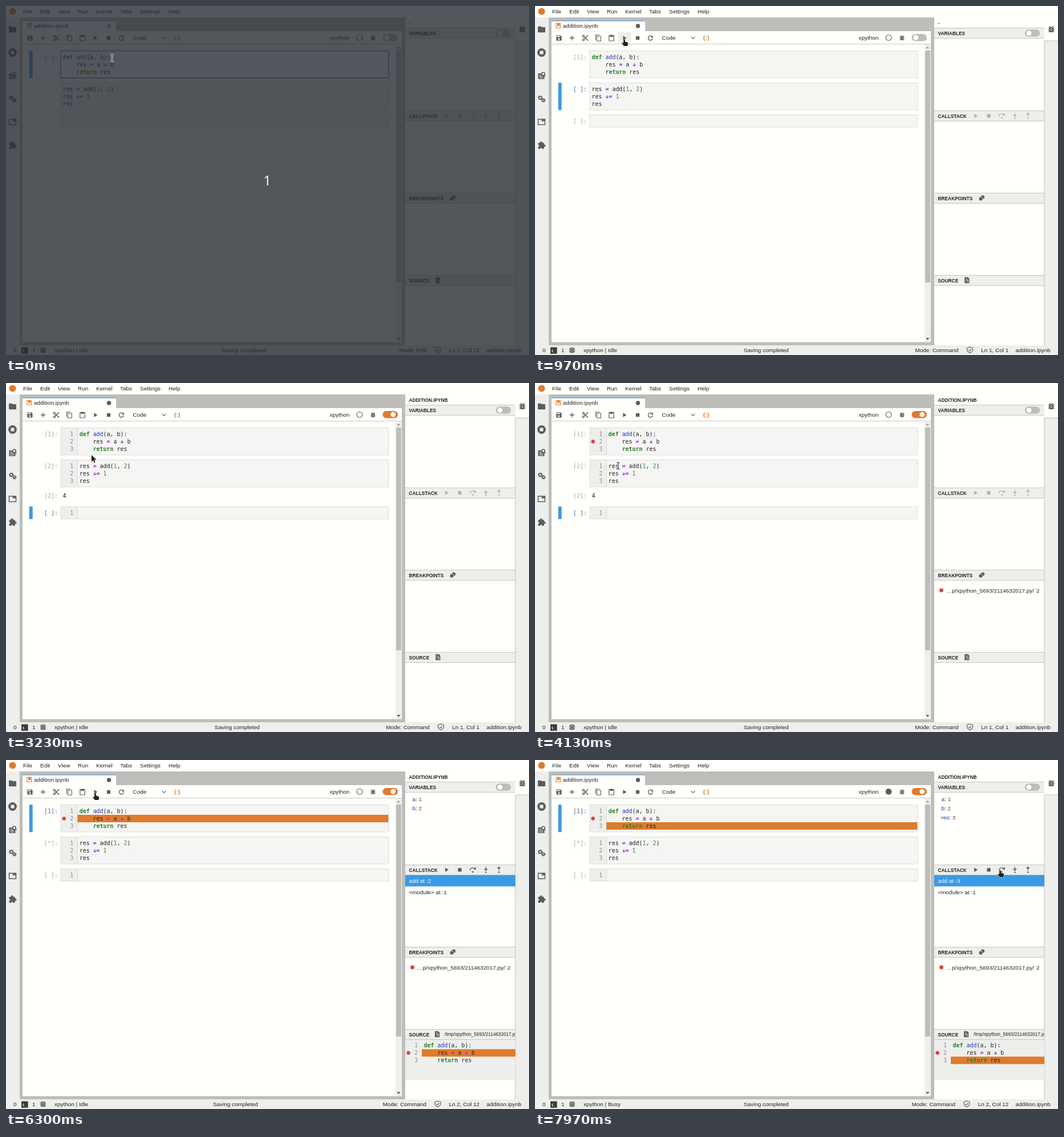
Animation, 917 px wide and 611 px high, one loop 8 s. Source, as an HTML page:

```html
<!DOCTYPE html>
<html lang="en">
<head>
<meta charset="utf-8">
<title>Notebook debugger</title>
<style>
html, body { margin: 0; width: 100%; height: 100%; overflow: hidden; background: #fffffc; }
svg { display: block; }
text { font: 9.95px "Liberation Sans", Arial, sans-serif; fill: #222; white-space: pre; }
.mono { font-family: "DejaVu Sans Mono", monospace; }
.head { font-size: 8.35px; font-weight: bold; }
.small { font-size: 8.2px; }
.kw { fill: #2a832a; font-weight: bold; }
.op { fill: #a02ae6; font-weight: bold; }
.num { fill: #3b8a3b; }
.fn { fill: #2035c0; }
.count { font: 23px "Noto Sans", sans-serif; fill: #fff; }
</style>
</head>
<body>
<svg id="stage" width="917" height="611" viewBox="0 0 917 611">
  <g id="base"></g><g id="live"></g><g id="cursor"></g>
</svg>
<script>
const LOOP = 8000;
const WHITE = '#fffffc', PANEL = '#eeeeec', GRAY = '#bdbdb9', ICON = '#5c5c5a',
      FAINT = '#b2b2af', BLUE = '#3c99e6', ORANGE = '#df7b2c', RED = '#d9413f';
const el = id => document.getElementById(id);

const rect = (x, y, w, h, fill, more = '') =>
  `<rect x="${x}" y="${y}" width="${w}" height="${h}" fill="${fill}" ${more}/>`;
const dot = (x, y, r, fill, more = '') => `<circle cx="${x}" cy="${y}" r="${r}" fill="${fill}" ${more}/>`;
const text = (x, y, s, cls = '', more = '') => `<text x="${x}" y="${y}" class="${cls}" ${more}>${s}</text>`;
const line = (d, color = ICON, w = 1.2) => `<path d="${d}" fill="none" stroke="${color}" stroke-width="${w}"/>`;
const shape = (d, fill = ICON) => `<path d="${d}" fill="${fill}" fill-rule="evenodd"/>`;
const at = (x, y, body, k = 1) => `<g transform="translate(${x} ${y}) scale(${k})">${body}</g>`;

// Icons are drawn around their centre.
const play = c => shape('M-2.6 -3.7V3.7L3.4 0z', c);
const stop = c => rect(-3.1, -3.1, 6.2, 6.2, c);
const bug = rect(-2.9, -3.4, 5.8, 7.4, ICON, 'rx="2.9"') +
  line('M-4.2 -2H4.2M-4.2 .6H4.2M-4.2 3.1H4.2M-2.6 -4.7L-1.3 -3.2M2.6 -4.7L1.3 -3.2', ICON, 1.1) +
  line('M-1.1 -.7H1.1M-1.1 1.4H1.1', PANEL, .9);
const stepOver = c => line('M-4.8 1A4.8 4.4 0 0 1 4 -1.7M4.7 -4.5V-1H1.2', c, 1.3) + dot(0, 3.6, 1.4, c);
const stepIn = c => line('M0 -5.4V.6M-2.8 -2L0 .9L2.8 -2', c, 1.3) + dot(0, 4.3, 1.3, c);
const stepOut = c => line('M0 -5V1.4M-2.8 -2.3L0 -5.1L2.8 -2.3', c, 1.3) + dot(0, 4.3, 1.3, c);
const gear = r => `<circle r="${r}" fill="none" stroke="${ICON}" stroke-width="1.7"/>
  <circle r="${r + 1.2}" fill="none" stroke="${ICON}" stroke-width="1.1" stroke-dasharray="1.2 1.4"/>`;
const toggle = (x, y, on) => rect(x, y, 26.5, 12.5, on ? ORANGE : GRAY, 'rx="6.25"') +
  dot(x + (on ? 18.3 : 7.3), y + 6.25, 4.4, WHITE);

function sideIcons() {
  const folder = shape('M-5.2 -5.2H-1.3L0 -3.9H5.2Q6.5 -3.9 6.5 -2.6V3.9Q6.5 5.2 5.2 5.2H-5.2Q-6.5 5.2 -6.5 3.9V-3.9Q-6.5 -5.2 -5.2 -5.2z');
  const running = dot(0, 0, 7.4, ICON) + rect(-3, -3, 6, 6, PANEL, 'rx=".6"');
  const inspect = shape('M-6 -4H1V-1H5V6H-6z') +
    line('M-4 -1H0M-4 1.5H2M-4 4H3', PANEL, 1) +
    dot(3, -3, 2.7, PANEL, `stroke="${ICON}" stroke-width="1.5"`) + line('M5 -1L7 1', ICON, 1.6);
  const gears = at(-2.2, -1.8, gear(2.4)) + at(3.2, 2.6, gear(2));
  const tab = line('M-6 -4.8H6V4.8H-6z', ICON, 1.5) + rect(0, -4.8, 6, 3.6, ICON);
  const puzzle = rect(-6, -4, 10.4, 10.4, ICON, 'rx="1"') + dot(-.8, -4.6, 2, ICON) + dot(5, 1, 2, ICON) +
    dot(-6, 1.2, 1.7, PANEL) + dot(-.8, 6.4, 1.7, PANEL);
  return [folder, running, inspect, gears, tab, puzzle].map((s, i) => at(11.5, 41 + i * 40.5, s)).join('');
}

function toolIcons() {
  const save = shape('M-4.6 -4.6H2.6L4.6 -2.6V4.6H-4.6zM-3.5 -3.5V-1.4H1.6V-3.5zM0 .4A1.6 1.6 0 1 0 .01 .4z');
  const add = line('M-4 0H4M0 -4V4', ICON, 1.3);
  const ring = `fill="none" stroke="${ICON}" stroke-width="1.2"`;
  const cut = `<circle cx="-3.2" cy="-3.2" r="1.6" ${ring}/><circle cx="-3.2" cy="3.2" r="1.6" ${ring}/>` +
    line('M-2 -2L5 4.6M-2 2L5 -4.6', ICON, 1.5);
  const copy = line('M-4.6 3.4V-5.2H2.2M-2.5 -3H4.3V5.3H-2.5z', ICON, 1.1);
  const paste = line('M-4.2 -4.4H4.2V5H-4.2z', ICON, 1.2) + rect(-2.6, -5.4, 5.2, 3.4, ICON);
  const restart = line('M3.2 -2.4A4 4 0 1 0 3.9 1', ICON, 1.3) + shape('M4.4 -4.6V-.6H.4z');
  const list = [[42, save], [65, add], [88, cut], [111, copy], [134, paste], [180, stop(ICON)], [202.5, restart]];
  return list.map(([x, s]) => at(x, 56, s)).join('');
}

function header(y, label) {
  return rect(700, y, 193, 19, PANEL) + line(`M700 ${y + .5}H893M700 ${y + 18.5}H893`, '#c6c6c3', 1) +
    text(706.5, y + 12.5, label, 'head');
}

function drawBase() {
  const menu = [['File', 30], ['Edit', 60], ['View', 91], ['Run', 126], ['Kernel', 158],
                ['Tabs', 200], ['Settings', 235], ['Help', 285]];
  const tabIcon = line('M36.8 30.2H44.6V38.2H36.8z', ORANGE, 1.1) + shape('M39 30.5H43.2V36L41.1 34.2L39 36z', ORANGE);
  const chip = line('M-3.4 -3.4H3.4V3.4H-3.4z', ICON, 1.3) + rect(-1.4, -1.4, 2.8, 2.8, ICON) +
    line('M-1.6 -5.4V5.4M1.6 -5.4V5.4M-5.4 -1.6H5.4M-5.4 1.6H5.4', ICON, .8);
  return rect(0, 0, 917, 611, GRAY) + rect(0, 0, 917, 20, WHITE) +
    rect(0, 20, 24, 574, PANEL) + rect(0, 594, 917, 17, PANEL) +
    dot(11.5, 9.5, 6, ORANGE) + menu.map(([s, x]) => text(x, 13, s)).join('') + sideIcons() +
    rect(29, 26, 164, 19, WHITE) + rect(29, 25.5, 164, 1.2, '#5ba4dc') + tabIcon + text(49, 38, 'addition.ipynb') +
    rect(29, 44, 665, 544.5, WHITE) + line('M29 66.7H694', '#c6c6c3', 1) + toolIcons() +
    text(222.5, 58.5, 'Code') + line('M274 54.2L277.2 57.4L280.4 54.2', ICON, 1.2) +
    text(294.5, 58.6, '{:}', '', `style="fill:${ORANGE};font-weight:bold"`) +
    text(567.5, 58.5, 'xpython') + at(643.5, 56, bug, .95) +
    rect(683, 67.5, 10.5, 521, PANEL) + shape('M685.3 74.2H691.3L688.3 70.8z', '#9b9b98') +
    shape('M685.3 581.2H691.3L688.3 584.6z', '#444') +
    rect(700, 20, 193, 574, WHITE) + header(38, 'VARIABLES') + header(183, 'CALLSTACK') +
    header(327, 'BREAKPOINTS') + header(471, 'SOURCE') + toggle(858.8, 41.3, false) +
    dot(785, 334.6, 3.2, ICON) + dot(781.6, 337.6, 3.5, ICON, `stroke="${PANEL}" stroke-width=".7"`) +
    rect(893, 20, 24, 574, PANEL) + rect(893, 20, 24, 41, WHITE) +
    line('M917 61H893V594', '#c0c0bd', 1) + at(905.3, 41, bug, 1.25) +
    text(13, 606, '0') + rect(27, 597.5, 11.6, 11.4, '#3a3a39') +
    text(28.6, 605.6, '$_', 'mono', 'style="font-size:6.5px;fill:#fff"') + text(46, 606, '1') +
    at(65, 602.6, chip) + text(842.5, 606, 'addition.ipynb');
}

const SOURCE = [['def add(a, b):', '    res = a + b', '    return res'], ['res = add(1, 2)', 'res += 1', 'res'], ['']];
const paint = s => s.replace(/(def|return)|(\+=|[=+])|(\b\d\b)|((?<=def )add)/g, (m, kw, op, num) =>
  `<tspan class="${kw ? 'kw' : op ? 'op' : num ? 'num' : 'fn'}">${m}</tspan>`);

// Code lines with optional numbers, breakpoint and stopped line.
function codeLines(rows, x, y, o) {
  return rows.map((row, i) => {
    const b = y + i * 13;
    let s = '';
    if (o.stopAt === i + 1) s += rect(x - 3.5, b - 10, o.width, 13, ORANGE);
    if (o.numbers) s += text(x - 10.5, b, i + 1, 'mono', 'text-anchor="end" style="fill:#8f8f8c"');
    if (o.mark === i + 1) s += dot(x - 27, b - 3.5, 3.2, RED);
    return s + text(x, b, paint(row), 'mono');
  }).join('');
}

const prompt = (y, s, color) => text(91, y, `[${s}]:`, 'mono', `text-anchor="end" style="fill:${color}"`);

function cell(s, i) {
  const y = i < 2 ? 78.5 + i * 56 : s.out ? 216.5 : 190.5;
  const h = i < 2 ? 47.5 : 21.5;
  const on = s.sel === i, edit = on && s.edit;
  let g = on ? rect(40.7, y - .3, 6, h + .6, BLUE, 'rx="1"') : '';
  g += rect(96, y, 575, h, edit ? WHITE : '#f5f5f3');
  if (s.debug) g += rect(96, y, 29.5, h, PANEL) + line(`M125.5 ${y}V${y + h}`, '#dcdcd9', 1);
  g += prompt(y + 14.5, s.prompts[i], on ? '#45718f' : '#a9a9a6');
  g += codeLines(SOURCE[i], s.debug ? 128.7 : 99.5, y + 14.5, {
    numbers: s.debug, mark: i === 0 && s.mark ? 2 : 0, stopAt: i === 0 ? s.stopAt : 0, width: 545.5 });
  return g + rect(96, y, 575, h, 'none', edit ? 'stroke="#3f86dc" stroke-width="1.5"' : 'stroke="#dededb"');
}

function output(s) {
  if (!s.out) return '';
  const on = s.sel === 1;
  return (on ? rect(40.7, 186.2, 6, 21.8, BLUE, 'rx="1"') : '') +
    prompt(200.5, 2, on ? '#a0504d' : '#a9a9a6') + text(99.5, 200.5, '4', 'mono');
}

function sidePanel(s) {
  let g = text(706.5, 32.5, s.debug ? 'ADDITION.IPYNB' : '-', 'head');
  const c = s.stack ? ICON : FAINT;
  [play, stop, stepOver, stepIn, stepOut].forEach((f, i) => g += at(772.7 + i * 22.9, 192.3, f(c)));
  s.vars.forEach((v, i) => g += text(712.5, 71.5 + i * 16.4,
    `<tspan class="fn">${v[0]}</tspan>: <tspan fill="#a02b3a">${v[1]}</tspan>`));
  if (s.stack) g += rect(700, 201.5, 193, 19.8, BLUE) +
    text(706.5, 214.6, `add at :${s.stack}`, '', 'style="fill:#fff"') + text(706.5, 234.5, '&lt;module> at :1');
  if (s.mark) g += dot(712.5, 363, 3.4, RED) + text(721, 366.5, '…p/xpython_5693/2114632017.py/') + text(879, 366.5, '2');
  g += at(s.source ? 756 : 757.3, 480, shape('M-4 -5.2H1.8L4.2 -2.8V5.2H-4z') +
    line('M-2 -2H1M-2 .4H3M0 2.8H3', PANEL, 1));
  if (s.source) g += `<svg x="700" y="472" width="193" height="89">` +
    text(69, 11.3, '/tmp/xpython_5693/2114632017.py', 'small') + rect(0, 18, 193, 70.5, PANEL) +
    codeLines(SOURCE[0], 32.6, 31.3, { numbers: true, mark: 2, stopAt: s.source, width: 164 }) + '</svg>';
  return g;
}

function status(s) {
  const wide = s.pos === 'Ln 2, Col 12';
  const mid = (s.edit ? 377.2 : 365.8) - (wide && !s.edit ? 2.9 : 0) + (s.busy ? 2.9 : 0);
  const shield = line('M0 -5L5 -3.2V0Q4.6 3.6 0 5.4Q-4.6 3.6 -5 0V-3.2z', ICON, 1.2) + line('M-2.4 .2L-.6 2L2.6 -1.4', ICON, 1.2);
  return text(85, 606, `xpython | ${s.busy ? 'Busy' : 'Idle'}`) + text(mid, 606, 'Saving completed') +
    text(wide ? 737 : 742.5, 606, `Mode: ${s.edit ? 'Edit' : 'Command'}`, '', 'text-anchor="end"') +
    at(wide ? 757 : 762.5, 602, shield) + text(wide ? 776.7 : 782.2, 606, s.pos);
}

function drawLive(s) {
  return (s.hover ? rect(145.5, 46, 22.5, 20, PANEL) : '') + at(157, 56, play(ICON)) +
    (s.dirty ? dot(180.5, 35, 3.7, ICON) : line('M177.5 32L183.5 38M183.5 32L177.5 38', ICON, 1.1)) +
    dot(620, 55.4, 4.9, s.busy ? ICON : 'none', `stroke="${ICON}" stroke-width="1.1"`) +
    toggle(660.5, 49, s.debug) + rect(684, 78, 9, s.thumb - 78, GRAY) +
    [0, 1, 2].map(i => cell(s, i)).join('') + output(s) + sidePanel(s) + status(s) +
    (s.veil ? rect(0, 0, 917, 611, 'rgba(41,45,52,.8)') + text(458, 314, '1', 'count', 'text-anchor="middle"') : '');
}

// Each step changes only the named parts of the state.
const two = [['a', 1], ['b', 2]];
const steps = [
  [0, { veil: true, sel: 0, edit: true, prompts: [' ', ' ', ' '], pos: 'Ln 2, Col 12', thumb: 484, vars: [] }],
  [30, { veil: false }],
  [570, { hover: true }],
  [770, { sel: 1, edit: false, dirty: true, busy: true, prompts: ['*', ' ', ' '], pos: 'Ln 1, Col 1' }],
  [970, { busy: false, prompts: [1, ' ', ' '] }],
  [1270, { sel: 2, busy: true, prompts: [1, '*', ' '] }],
  [1300, { out: true, prompts: [1, 2, ' '], thumb: 468 }],
  [1530, { busy: false }],
  [1630, { hover: false }],
  [2600, { debug: true, busy: true }],
  [2670, { busy: false }],
  [3770, { mark: true, busy: true }],
  [3830, { busy: false }],
  [4330, { sel: 1, edit: true, pos: 'Ln 1, Col 5' }],
  [5270, { edit: false }],
  [5370, { hover: true }],
  [5570, { sel: 2, out: false, busy: true, prompts: [1, '*', ' '], pos: 'Ln 1, Col 1' }],
  [5770, { sel: 0, busy: false, stopAt: 2, stack: 2, pos: 'Ln 2, Col 12' }],
  [5870, { source: 2 }],
  [5930, { vars: two }],
  [6300, { hover: false, thumb: 484 }],
  [7300, { vars: [], stack: 0, source: 0, stopAt: 0, busy: true }],
  [7370, { busy: false }],
  [7430, { stack: 3, stopAt: 3 }],
  [7500, { source: 3 }],
  [7570, { vars: [...two, ['res', 3]] }],
  [7970, { busy: true }]
];

// Pointer path: time, x, y, pointer kind from then on.
const path = [
  [0, 186, 91, 'beam'], [330, 186, 91, 'beam'], [450, 173, 76, 'arrow'], [570, 159, 60, 'hand'],
  [630, 156.5, 58, 'hand'], [1530, 156.5, 58, 'arrow'], [2230, 668, 56, 'hand'], [2300, 671, 55, 'hand'],
  [2630, 671, 55, 'arrow'], [3230, 150, 126, 'arrow'], [3270, 146, 124, 'beam'], [3330, 138, 123, 'beam'],
  [3430, 132, 119, 'beam'], [3500, 122, 111, 'arrow'], [3630, 100, 100, 'arrow'], [3800, 100, 100, 'arrow'],
  [3930, 128, 120, 'beam'], [4130, 146, 145, 'beam'], [4600, 146, 145, 'beam'], [4700, 148, 132, 'arrow'],
  [5030, 153, 65, 'arrow'], [5240, 153, 65, 'arrow'], [5270, 155, 63, 'arrow'], [5370, 156.5, 58, 'hand'],
  [6370, 156.5, 58, 'arrow'], [6970, 812, 188, 'hand'], [7030, 815.5, 193, 'hand'], [LOOP, 815.5, 193, 'hand']
];
const edge = 'fill="#222" stroke="#fff" stroke-width=".9" paint-order="stroke"';
const pointers = {
  arrow: `<path d="M0 0V12L2.8 9.4L4.7 13.6L6.7 12.7L4.8 8.6H8.7z" ${edge}/>`,
  hand: `<path d="M-1.4 1Q0 -1 1.4 1V4.6L5 5.4Q6.9 5.9 6.6 7.6L5.9 12H-.6L-4 7.4Q-3.8 5.7 -2.2 6.4L-1.4 7z" ${edge}/>`,
  beam: line('M-2.8 -6Q0 -6 0 -4.6Q0 -6 2.8 -6M0 -5V5M-2.8 6Q0 6 0 4.6Q0 6 2.8 6', '#fff', 2.6) +
    line('M-2.8 -6Q0 -6 0 -4.6Q0 -6 2.8 -6M0 -5V5M-2.8 6Q0 6 0 4.6Q0 6 2.8 6', '#222', 1.1)
};

let shown = -1, kind = '';
function render(t) {
  const n = steps.filter(s => s[0] <= t).length;
  if (n !== shown) {
    shown = n;
    el('live').innerHTML = drawLive(Object.assign({}, ...steps.slice(0, n).map(s => s[1])));
  }
  const i = path.findIndex(p => p[0] > t);
  const a = path[i - 1], b = path[i];
  const u = (t - a[0]) / (b[0] - a[0]);
  const e = b[0] - a[0] > 500 ? u * u * (3 - 2 * u) : u;
  if (kind !== a[3]) el('cursor').innerHTML = pointers[kind = a[3]];
  el('cursor').setAttribute('transform', `translate(${a[1] + (b[1] - a[1]) * e} ${a[2] + (b[2] - a[2]) * e})`);
}

el('base').innerHTML = drawBase();
render(0);
const start = performance.now();
(function tick() {
  render((performance.now() - start) % LOOP);
  requestAnimationFrame(tick);
})();
</script>
</body>
</html>
```
